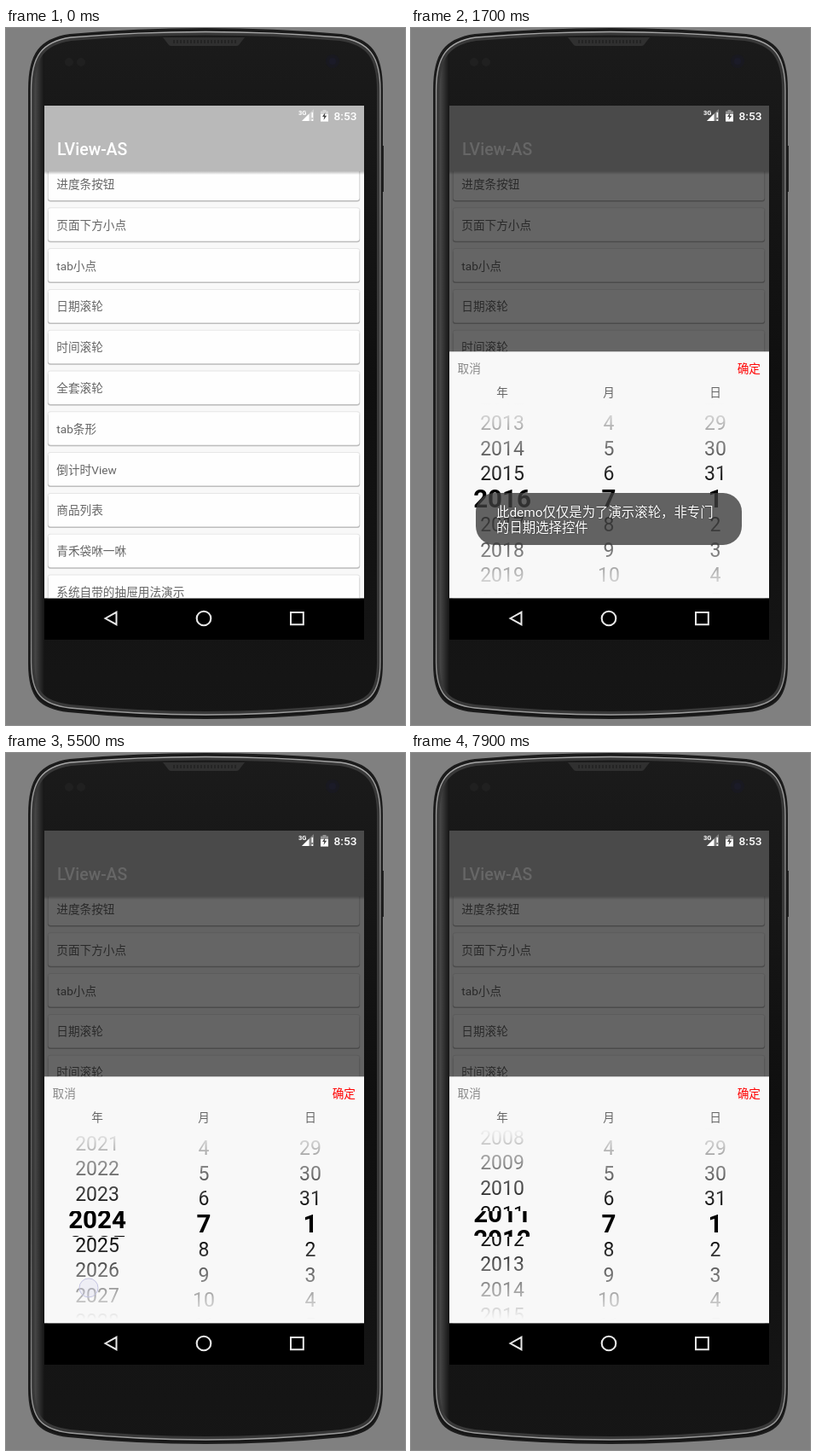
An HTML page with a canvas for the animation above (8 s loop, 468 px wide and 817 px high).

```html
<!DOCTYPE html>
<html lang="zh-CN">
<head>
<meta charset="utf-8">
<title>LView-AS</title>
<style>
html, body { margin: 0; width: 468px; height: 817px; overflow: hidden; background: #808080; }
canvas { display: block; }
</style>
</head>
<body>
<canvas id="stage" width="468" height="817"></canvas>
<script>
const ctx = document.getElementById('stage').getContext('2d');
const FONT = 'Roboto, "Noto Sans CJK SC", "Noto Sans CJK", sans-serif';
const LOOP = 8000, STEP = 100;
const LEFT = 45, TOP = 91, WIDTH = 375, LIST_TOP = 168, NAV_TOP = 668.6, SHEET_TOP = 379.3;
const ROW = 29.75, CENTER = 551.8, WHEEL_TOP = 440, BAND_TOP = 537, BAND_END = 567, WHEEL_END = 664;
const LAST_YEAR = 2029;
const ITEMS = ['进度条按钮', '页面下方小点', 'tab小点', '日期滚轮', '时间滚轮', '全套滚轮',
  'tab条形', '倒计时View', '商品列表', '青禾袋咻一咻', '系统自带的抽屉用法演示'];

// Each swipe turns the year wheel; the finger starts at y.
const SWIPES = [
  { start: 3400, end: 4500, from: 2016, to: 2022, y: 636 },
  { start: 4700, end: 5100, from: 2022, to: 2024, y: 632 },
  { start: 5400, end: 6300, from: 2024, to: 2029, y: 632 },
  { start: 6600, end: 8160, from: 2029, to: 2010, y: 480 },
];

const ramp = (t, a, b) => Math.min(1, Math.max(0, (t - a) / (b - a)));
const smooth = p => p * p * (3 - 2 * p);

// Text centred vertically on y.
function text(str, x, y, size, color, align = 'left', weight = 400) {
  ctx.font = `${weight} ${size}px ${FONT}`;
  ctx.textAlign = align;
  ctx.fillStyle = color;
  ctx.fillText(str, x, y + size * 0.36);
}

function rect(x, y, w, h, color) {
  ctx.fillStyle = color;
  ctx.fillRect(x, y, w, h);
}

function shape(path, fill, stroke, width = 1) {
  if (fill) { ctx.fillStyle = fill; ctx.fill(path); }
  if (stroke) { ctx.strokeStyle = stroke; ctx.lineWidth = width; ctx.stroke(path); }
}

function circle(x, y, r, fill, stroke, width) {
  const path = new Path2D();
  path.arc(x, y, r, 0, Math.PI * 2);
  shape(path, fill, stroke, width);
}

function rounded(x, y, w, h, r, fill) {
  const path = new Path2D();
  path.roundRect(x, y, w, h, r);
  shape(path, fill);
}

function blend(g, colors) {
  colors.forEach((c, i) => g.addColorStop(i / (colors.length - 1), c));
  return g;
}
const vertical = (y0, y1, ...colors) => blend(ctx.createLinearGradient(0, y0, 0, y1), colors);
const horizontal = (x0, x1, ...colors) => blend(ctx.createLinearGradient(x0, 0, x1, 0), colors);

function clipped(x, y, w, h, draw) {
  ctx.save();
  ctx.beginPath();
  ctx.rect(x, y, w, h);
  ctx.clip();
  draw();
  ctx.restore();
}

const BODY = new Path2D('M27 72C27 30 40 13 75 8Q234-6 393 8C428 13 441 30 441 72V745C441 785 428 797 395 801Q234 817 73 801C40 797 27 785 27 745Z');
const RIM = new Path2D('M29.5 73C29.5 33 42 16 76 11Q234-2 392 11C426 16 439 33 439 73V743C439 781 426 793 393 797Q234 813 75 797C42 793 29.5 781 29.5 743Z');

function drawPhone() {
  rect(0, 0, 468, 817, '#808080');
  rect(440, 138, 3, 54, '#222');
  shape(BODY, vertical(0, 817, '#1b1b1b', '#0f0f0f', '#161616'), '#1c1c1c', 2);
  ctx.save();
  ctx.clip(RIM);
  rect(27, 0, 18, 817, horizontal(27, 45, '#6c6c6c', '#4c4c4c', '#303030', '#151515'));
  shape(RIM, null, '#383838', 8);
  ctx.restore();
  shape(RIM, null, vertical(0, 817, '#a8a8a8', '#6c6c6c', '#606060', '#a0a0a0'), 1.4);
  shape(new Path2D('M184 11H280L273 20Q272 21 270 21H194Q192 21 191 20Z'), '#303030');
  for (let x = 196; x < 270; x += 4) rect(x, 14, 2, 4, '#242424');
  circle(74, 40, 5, '#202020');
  circle(88, 40, 5, '#202020');
  circle(383, 39, 8, '#191920');
  circle(383, 39, 4, '#1b1b28');
}

function drawList() {
  rect(LEFT, TOP, WIDTH, NAV_TOP - TOP, '#f8f8f8');
  clipped(LEFT, LIST_TOP, WIDTH, NAV_TOP - LIST_TOP, () => {
    ITEMS.forEach((label, i) => {
      const y = 183 + i * 47.8;
      rounded(48.5, y - 20.5, 367, 41, 3.5, '#e6e6e6');
      rounded(49, y - 18, 366, 38.5, 3, '#bdbdbd');
      rounded(49.5, y - 19.5, 365, 38.5, 3, '#fefefe');
      text(label, 59.3, y, 13.65, '#666');
    });
    rect(LEFT, LIST_TOP, WIDTH, 4, vertical(LIST_TOP, LIST_TOP + 4, 'rgba(0,0,0,.25)', 'rgba(0,0,0,0)'));
  });
  rect(LEFT, TOP, WIDTH, LIST_TOP - TOP, '#b9b9b9');
  text('LView-AS', 60, 141.5, 19.5, '#fff', 'left', 500);
}

function drawStatus() {
  text('3G', 343, 99, 7.5, '#fff', 'left', 700);
  shape(new Path2D('M347 109H361V95Z'), 'rgba(255,255,255,.3)');
  shape(new Path2D('M347 109H355.5V100.5Z'), '#fff');
  rect(358.5, 99, 1.6, 6, '#fff');
  rect(358.5, 107, 1.6, 2, '#fff');
  shape(new Path2D('M369 97.5H371.5V96H375.5V97.5H378V109.5H369Z'), 'rgba(255,255,255,.4)');
  rect(369, 101, 9, 8.5, '#fff');
  shape(new Path2D('M374.5 99L371 104H373.3L372.5 108L376.2 102.8H373.8Z'), '#444');
  text('8:53', 411.5, 102.6, 13.7, '#fff', 'right', 500);
}

function drawNav() {
  rect(LEFT, NAV_TOP, WIDTH, 717 - NAV_TOP, '#000');
  shape(new Path2D('M116.5 692L129.5 684.8V699.2Z'), null, '#e8e8e8', 2);
  circle(232, 692, 8.3, null, '#e8e8e8', 2.1);
  shape(new Path2D('M334 685H348.8V699.3H334Z'), null, '#e8e8e8', 2);
}

function drawWheel(x, pos, label) {
  const rows = (size, weight) => {
    for (let v = Math.floor(pos) - 4; v <= Math.floor(pos) + 5; v++) {
      text(label(v), x, CENTER + (v - pos) * ROW, size, '#000', 'center', weight);
    }
  };
  const strip = (from, to, size, weight) =>
    clipped(x - 60, from, 120, to - from, () => rows(size, weight));
  strip(WHEEL_TOP, BAND_TOP, 23, 400);
  strip(BAND_TOP, BAND_END, 29.5, 700);
  strip(BAND_END, WHEEL_END, 23, 400);
}

function drawSheet(year) {
  const solid = 'rgb(248,248,248)', clear = 'rgba(248,248,248,0)';
  rect(LEFT, SHEET_TOP, WIDTH, NAV_TOP - SHEET_TOP, solid);
  text('取消', 54.5, 399, 13.65, '#888');
  text('确定', 410, 399, 13.65, '#f00', 'right');
  ['年', '月', '日'].forEach((s, i) => text(s, 107 + i * 125, 427, 13.65, '#666', 'center'));
  drawWheel(107, year, v => v > LAST_YEAR ? '' : v);
  drawWheel(232, 7, v => (v + 11) % 12 + 1);
  drawWheel(357, 1, v => (v + 30) % 31 + 1);
  rect(LEFT, WHEEL_TOP, WIDTH, BAND_TOP - WHEEL_TOP, vertical(WHEEL_TOP, BAND_TOP, solid, clear));
  rect(LEFT, BAND_END, WIDTH, WHEEL_END - BAND_END, vertical(BAND_END, WHEEL_END, clear, solid));
}

function drawToast(alpha) {
  ctx.save();
  ctx.globalAlpha = alpha;
  rounded(76, 545, 312, 61, 22, 'rgba(62,62,62,.8)');
  ctx.shadowColor = 'rgba(0,0,0,.6)';
  ctx.shadowBlur = 2;
  text('此demo仅仅是为了演示滚轮，非专门', 100, 567, 15.4, '#fff');
  text('的日期选择控件', 100, 585.8, 15.4, '#fff');
  ctx.restore();
}

function draw(t) {
  let year = 2016, finger = null;
  for (const s of SWIPES) {
    if (t <= s.start) break;
    year = s.from + (s.to - s.from) * smooth(ramp(t, s.start, s.end));
    finger = t <= s.start + 300 ? s.y - (year - s.from) * ROW : null;
  }

  drawPhone();
  drawList();
  rect(LEFT, TOP, WIDTH, NAV_TOP - TOP, `rgba(0,0,0,${0.6 * ramp(t, 950, 1550)})`);
  drawStatus();
  clipped(LEFT, TOP, WIDTH, NAV_TOP - TOP, () => {
    ctx.translate(0, (NAV_TOP - SHEET_TOP) * (1 - ramp(t, 1100, 1700)) ** 2);
    drawSheet(year);
  });
  drawNav();
  drawToast(ramp(t, 800, 1230) * (1 - ramp(t, 2700, 3100)));
  if (finger !== null) circle(97, finger, 11, 'rgba(215,215,240,.3)', '#c4c4e2', 1);
}

function tick() {
  draw(Math.floor(performance.now() % LOOP / STEP) * STEP);
  requestAnimationFrame(tick);
}
tick();
</script>
</body>
</html>
```
